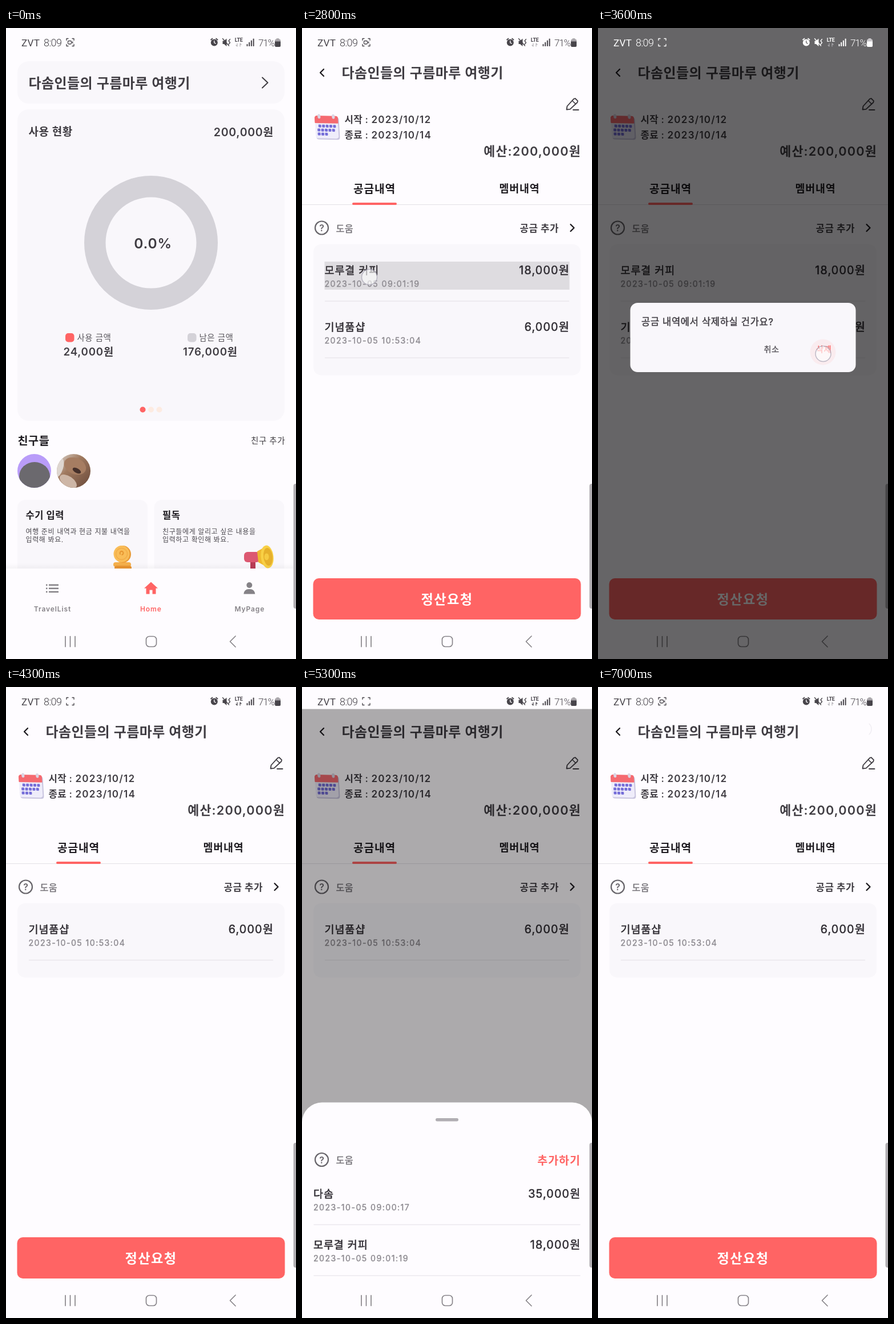
Animation of 508x1102 px, one loop 7100 ms. Source, as an HTML page with a canvas:

```html
<!DOCTYPE html>
<html lang="ko">
<head>
<meta charset="utf-8">
<title>여행 공금</title>
<style>
html, body { margin: 0; width: 100%; height: 100%; overflow: hidden; background: #fefcff; }
canvas { display: block; width: 508px; height: 1102px; }
</style>
</head>
<body>
<canvas id="stage" width="508" height="1102"></canvas>
<script>
const W = 508, H = 1102, LOOP = 7100, STEP = 100;
const BG = '#fefcff', CARD = '#f9f7fb', CORAL = '#ff6464', INK = '#403d43', DARK = '#1f1c21',
  GREY = '#77747a', LINE = '#e3e0e5', RING = '#d4d2d8';
const KO = 'Inter, "Noto Sans CJK KR", "Noto Sans CJK", sans-serif';
const TRIP = '다솜인들의 구름마루 여행기';
const ITEMS = [
  { name: '다솜', sum: '35,000원', date: '2023-10-05 09:00:17' },
  { name: '모루결 커피', sum: '18,000원', date: '2023-10-05 09:01:19' },
  { name: '기념품샵', sum: '6,000원', date: '2023-10-05 10:53:04' }
];
const canvas = document.getElementById('stage');
const c = canvas.getContext('2d');

const clamp = v => Math.max(0, Math.min(1, v));
const ramp = (t, from, to) => clamp((t - from) / (to - from));
const easeOut = u => 1 - (1 - u) ** 3;
const easeIn = u => u * u;

// y is the vertical middle of the glyphs; medium weight is regular with a thin outline
function text(s, x, y, size, o = {}) {
  const { w = 600, color = INK, ls = 0, align = 'left', font = KO } = o;
  const medium = w === 500;
  c.font = `${medium ? 400 : w} ${size}px ${font}`;
  c.letterSpacing = ls + 'px';
  c.textAlign = align;
  c.fillStyle = c.strokeStyle = color;
  c.fillText(s, x, y + size * 0.365);
  if (medium) {
    c.lineWidth = size * 0.028;
    c.strokeText(s, x, y + size * 0.365);
  }
}
function box(x, y, w, h, r, color) {
  c.fillStyle = color;
  c.beginPath();
  c.roundRect(x, y, w, h, r);
  c.fill();
}
function oval(x, y, rx, ry, color, turn = 0) {
  c.fillStyle = color;
  c.beginPath();
  c.ellipse(x, y, rx, ry, turn, 0, 7);
  c.fill();
}
const disc = (x, y, r, color) => oval(x, y, r, r, color);
function poly(points, { fill, stroke, lw = 1, close = false }) {
  c.beginPath();
  points.forEach(([x, y], i) => i ? c.lineTo(x, y) : c.moveTo(x, y));
  if (close || fill) c.closePath();
  c.lineJoin = c.lineCap = 'round';
  if (fill) { c.fillStyle = fill; c.fill(); }
  if (stroke) { c.strokeStyle = stroke; c.lineWidth = lw; c.stroke(); }
}
function ring(x, y, r, color, lw, from = 0, to = 7) {
  c.strokeStyle = color;
  c.lineWidth = lw;
  c.beginPath();
  c.arc(x, y, r, from, to);
  c.stroke();
}
const hline = (x1, x2, y, color = LINE) => { c.fillStyle = color; c.fillRect(x1, y, x2 - x1, 1); };
function shade(alpha, y = 0) {
  c.fillStyle = `rgba(0,0,0,${alpha})`;
  c.fillRect(0, y, W, H - y);
}
// Fades everything drawn so far towards the background
function veil(visible) {
  c.globalAlpha = 1 - visible;
  c.fillStyle = BG;
  c.fillRect(0, 0, W, H);
  c.globalAlpha = 1;
}
function touch(x, y) {
  disc(x, y, 14, 'rgba(255,255,255,.62)');
  ring(x, y, 13.5, 'rgba(130,125,150,.5)', 1.5);
}
function inCircle(x, y, r, draw) {
  c.save();
  c.beginPath();
  c.arc(x, y, r, 0, 7);
  c.clip();
  draw();
  c.restore();
}

function avatars() {
  inCircle(49.5, 773.5, 29.5, () => {
    c.fillStyle = '#b99cf9';
    c.fillRect(20, 744, 60, 60);
    oval(50, 783, 27, 25, '#6b696e');
  });
  inCircle(118.5, 773.5, 29.5, () => {
    const g = c.createLinearGradient(95, 750, 145, 800);
    g.addColorStop(0, '#cfc0b4');
    g.addColorStop(0.35, '#a07a60');
    g.addColorStop(1, '#6d4c3c');
    c.fillStyle = g;
    c.fillRect(88, 743, 61, 61);
    oval(93, 768, 7, 17, '#ded6d0', 0.3);
    oval(121, 765, 20, 14, '#a67d62', 0.4);
    oval(109, 792, 17, 9, '#cdb6a6', 0.6);
    oval(124, 773, 8, 4, '#46302a', 0.5);
  });
}
function coins() {
  box(188, 933, 31, 8, 4, '#f5b04b');
  box(190, 939, 30, 8, 4, '#e99532');
  oval(204.5, 919, 14.5, 15, '#e89a36');
  oval(202.5, 918.5, 14, 14.5, '#f9bd58');
  ring(202.5, 918.5, 10, '#f2ad48', 1.5);
  ring(202.5, 917, 3, '#e79630', 2, 2.5, 7.6);
}
function megaphone() {
  box(428, 928, 9, 20, 3, '#b93c55');
  box(417, 915, 28, 18, 6, '#dc5871');
  poly([[440, 914], [457, 904.5], [460, 943], [442, 933]], { fill: '#efb92f' });
  oval(457.5, 923.5, 11, 20, '#f8d045', -0.12);
  oval(459, 923.5, 8, 15.5, '#e6b02c', -0.12);
  oval(456.5, 923.5, 4, 6, '#f6cb42');
}
function noteCard(x, title, lines) {
  box(x, 824, 228, 140, 14, CARD);
  text(title, x + 14.5, 851, 16.5, { color: DARK, ls: 0.5 });
  lines.forEach((s, i) => text(s, x + 14.5, 879.5 + i * 14.5, 12, { w: 400, color: '#4d4a50', ls: 0.62 }));
}
function legend(x, color, label, sumX, sum) {
  box(x, 533, 15.5, 15.5, 5, color);
  text(label, x + 20.5, 540.5, 14.5, { w: 400, color: '#5a575d', ls: 0.5 });
  text(sum, sumX, 565.5, 18.7, { ls: 0.8 });
}
function tabBar() {
  const g = c.createLinearGradient(0, 934, 0, 944);
  g.addColorStop(0, 'rgba(0,0,0,0)');
  g.addColorStop(1, 'rgba(0,0,0,.035)');
  c.fillStyle = g;
  c.fillRect(0, 934, W, 10);
  c.fillStyle = BG;
  c.fillRect(0, 944, W, H - 944);
  const tone = '#858287';
  for (const y of [971.5, 977.5, 983.5]) {
    box(70, y, 2.5, 2.5, 0, tone);
    box(75, y, 17, 2.5, 0, tone);
  }
  poly([[254, 967.5], [266, 978.5], [262.5, 978.5], [262.5, 988.5], [256.5, 988.5], [256.5, 981.5],
    [251.5, 981.5], [251.5, 988.5], [245.5, 988.5], [245.5, 978.5], [242, 978.5]], { fill: CORAL });
  disc(426.3, 973, 5, tone);
  box(416.3, 980, 20, 8.5, [9, 9, 0, 0], tone);
  const label = (s, x, color) => text(s, x, 1014.5, 12, { color, ls: 0.9, align: 'center' });
  label('TravelList', 81.5, tone);
  label('Home', 253.8, CORAL);
  label('MyPage', 426.8, tone);
}
function homePage(t) {
  box(20, 58, 468, 74, 20, CARD);
  if (t >= 800) box(20, 58, 468, 74, 20, 'rgba(0,0,0,.07)');
  text(TRIP, 39.5, 96, 24, { ls: 0.45 });
  poly([[449, 86.5], [458.5, 95.5], [449, 104.5]], { stroke: INK, lw: 2 });
  box(20, 142, 468, 544, 20, CARD);
  text('사용 현황', 39.5, 181.5, 19, { ls: 0.5 });
  text('200,000원', 469, 181.5, 19.5, { ls: 0.7, align: 'right' });
  ring(254, 375, 98.25, RING, 37.5);
  text('0.0%', 257.5, 376, 24.5, { ls: 0.8, align: 'center' });
  legend(104, CORAL, '사용 금액', 100.5, '24,000원');
  legend(318, RING, '남은 금액', 310, '176,000원');
  [CORAL, '#fdebe1', '#fdebe1'].forEach((color, i) => disc(239.5 + i * 14.5, 666.5, 5, color));
  text('친구들', 20.5, 720.5, 19.7, { color: DARK, ls: 0.5 });
  text('친구 추가', 489, 720.5, 14.5, { w: 400, ls: 0.5, align: 'right' });
  avatars();
  noteCard(20, '수기 입력', ['여행 준비 내역과 현금 지불 내역을', '입력해 봐요.']);
  noteCard(259.5, '필독', ['친구들에게 알리고 싶은 내용을', '입력하고 확인해 봐요.']);
  coins();
  megaphone();
  tabBar();
}

function calendar() {
  c.save();
  c.transform(1, 0.02, 0.06, 1, -11, -1);
  box(25, 156, 41, 39, 4, '#c9c5df');
  box(24, 155, 40, 38, 4, '#efedfa');
  box(23.5, 153.5, 41, 13, [4, 4, 1, 1], '#f56a70');
  for (const x of [29, 54]) box(x, 150.5, 5, 8, 2.5, '#dcd6e4');
  for (let i = 0; i < 13; i++) {
    const row = Math.floor(i / 5), col = i % 5;
    box(27.5 + col * 6.4 + (row ? 0 : 2), 169 + row * 7, 5, 5, 1.3, '#756ed8');
  }
  c.restore();
}
function pencil() {
  poly([[463.5, 142.5], [464.5, 136.5], [476, 123.8], [478.5, 123], [483, 127.3], [482.3, 130], [469.5, 141.8]],
    { stroke: INK, lw: 1.8, close: true });
  poly([[473.5, 127], [479.5, 132.8]], { stroke: INK, lw: 1.6 });
  poly([[475, 143], [484.5, 143]], { stroke: INK, lw: 1.8 });
}
function help(y) {
  ring(34.5, y, 11.5, '#68656b', 2.2);
  text('?', 34.5, y + 0.5, 16, { color: '#68656b', align: 'center' });
  text('도움', 59.5, y + 1, 16.2, { w: 500, color: GREY, ls: 0.4 });
}
function entry({ name, sum, date }, x1, x2, y) {
  text(name, x1 - 0.5, y, 18.5, { w: 500, color: '#302d33', ls: 0.9 });
  text(sum, x2 + 1, y, 19.7, { w: 500, color: '#302d33', ls: 1.2, align: 'right' });
  text(date, x1 - 0.5, y + 24, 14.2, { w: 500, color: '#8d8a90', ls: 1.45 });
  hline(x1, x2, y + 53.5);
}
function period(label, date, y) {
  text(label, 74.5, y, 16.8, { ls: 0.3 });
  text(date, 121.5, y, 17.1, { ls: 1.2 });
}
function detailPage(t) {
  poly([[38, 72], [32, 78], [38, 84]], { stroke: DARK, lw: 2.3 });
  text(TRIP, 69.5, 78.5, 24, { ls: 0.45 });
  pencil();
  calendar();
  period('시작 :', '2023/10/12', 160);
  period('종료 :', '2023/10/14', 186.5);
  text('예산:200,000원', 489, 215, 21.7, { ls: 1.2, align: 'right' });
  text('공금내역', 127, 280.5, 19.2, { color: DARK, ls: 0.9, align: 'center' });
  text('멤버내역', 381, 280.5, 18.4, { color: DARK, ls: 0.8, align: 'center' });
  hline(0, W, 308);
  box(88, 305, 78, 4, 2, CORAL);
  help(349);
  text('공금 추가', 450, 349.5, 16.8, { ls: 0.5, align: 'right' });
  poly([[470.5, 343], [476.5, 349], [470.5, 355]], { stroke: DARK, lw: 2.3 });

  const list = t >= 3800 ? ITEMS.slice(2) : ITEMS.slice(1);
  box(20, 377.5, 468, 31 + list.length * 99, 14, CARD);
  const held = ramp(t, 2100, 2600) * (1 - ramp(t, 2900, 3200));
  if (held) box(39.5, 408, 429, 49, 0, `rgba(0,0,0,${0.11 * held})`);
  list.forEach((item, i) => entry(item, 40, 468, 423 + i * 99));

  box(19.5, 961, 469, 72, 10, CORAL);
  text('정산요청', 254, 998, 23.2, { color: '#fff', ls: 1.4, align: 'center' });
}
function sheet(u, dim) {
  if (dim) shade(0.325 * dim, 38.5);
  if (!u) return;
  c.save();
  c.translate(0, (1 - u) * (H - 726));
  box(0, 725.5, W, H, [35, 35, 0, 0], BG);
  box(234, 753, 40, 5.5, 2.7, '#b1aeb3');
  help(825.5);
  text('추가하기', 488, 826.5, 19.5, { color: CORAL, ls: 1, align: 'right' });
  entry(ITEMS[0], 20.5, 487.5, 885);
  entry(ITEMS[1], 20.5, 487.5, 974);
  c.restore();
  if (u === 1) { c.fillStyle = BG; c.fillRect(0, 1043, W, H - 1043); }
}
function dialog(u, t) {
  if (!u) return;
  c.globalAlpha = u;
  box(56.5, 480, 395, 121, 13, CARD);
  text('공금 내역에서 삭제하실 건가요?', 76, 513, 16.5, { w: 500, ls: 0.7 });
  text('취소', 290.5, 560.5, 14.2, { w: 500, color: '#5f5c62', ls: 0.5 });
  if (t >= 3600) disc(394, 566, 22.5, 'rgba(255,100,100,.08)');
  text('삭제', 382, 560.5, 14.2, { w: 500, color: CORAL, ls: 0.5 });
  c.globalAlpha = 1;
}

function navKeys() {
  const tone = '#88858a';
  for (const x of [104, 112.5, 121]) poly([[x, 1062.5], [x, 1080.5]], { stroke: tone, lw: 1.7 });
  c.beginPath();
  c.roundRect(245.5, 1062.5, 18, 18, 5.5);
  c.stroke();
  poly([[402, 1062], [392.5, 1071.5], [402, 1081]], { stroke: tone, lw: 1.7 });
}
function statusBar(t, light) {
  const tone = light ? '#fff' : '#48454b', back = light ? '#676568' : BG;
  const font = 'Roboto, sans-serif';
  text('ZVT', 27, 25.5, 17.2, { w: 400, color: tone, font, ls: 0.3 });
  text('8:09', 66, 25.5, 18, { w: 300, color: tone, font, ls: -0.6 });

  // Screen recorder mark, blinking once a second
  for (const [sx, sy] of [[-1, -1], [1, -1], [-1, 1], [1, 1]])
    poly([[112.5 + sx * 3.5, 25 + sy * 6.5], [112.5 + sx * 6.5, 25 + sy * 6.5], [112.5 + sx * 6.5, 25 + sy * 3.5]],
      { stroke: tone, lw: 1.3 });
  if ((t + 200) % 1000 < 500) {
    c.beginPath();
    c.roundRect(108.5, 22.5, 6, 5.5, 1.5);
    c.stroke();
    poly([[115, 25], [117.3, 23], [117.3, 27.5]], { fill: tone });
  }

  disc(364.8, 25.5, 6, tone);
  poly([[359, 20.5], [361.5, 18.5]], { stroke: tone, lw: 1.8 });
  poly([[368, 18.5], [370.6, 20.5]], { stroke: tone, lw: 1.8 });
  poly([[364.8, 22.3], [364.8, 25.8], [367.3, 27]], { stroke: back, lw: 1.3 });
  poly([[379.5, 22.5], [382, 22.5], [386.5, 18.5], [386.5, 32], [382, 28], [379.5, 28]], { fill: tone });
  poly([[379.5, 18.5], [390.5, 31]], { stroke: tone, lw: 1.4 });
  poly([[392.5, 19.5], [390, 22.5], [392.5, 25.5], [390, 28.5]], { stroke: tone, lw: 1.3 });
  text('LTE', 407.6, 20.5, 9, { w: 600, color: tone, font, align: 'center', ls: -0.3 });
  const busy = (t >= 1800 && t < 2800) || (t >= 3800 && t < 5800);
  const arrow = busy ? tone : light ? '#aaa8ac' : '#b5b2b7';
  poly([[405, 27], [405, 32], [403, 30]], { stroke: arrow, lw: 1.2 });
  poly([[410, 32], [410, 27], [412, 29]], { stroke: arrow, lw: 1.2 });
  for (let i = 0; i < 4; i++) box(421.5 + i * 3.7, 28 - i * 3.2, 2, 4 + i * 3.2, 0.8, tone);
  text('71%', 442, 25.5, 17, { w: 300, color: tone, font, ls: -1.2 });
  box(473.5, 18, 5, 3, 1, light ? '#c9c7ca' : '#b0adb2');
  box(471, 19.5, 10, 13.5, 2.5, light ? '#c9c7ca' : '#aaa7ac');
  box(471, 23.5, 10, 9.5, [0, 0, 2.5, 2.5], tone);
}

function draw(t) {
  c.fillStyle = BG;
  c.fillRect(0, 0, W, H);
  if (t < 1100) {
    homePage(t);
    veil(1 - ramp(t, 850, 1050));
    if (t >= 800 && t < 1000) touch(260, 96);
  } else {
    detailPage(t);
    veil(ramp(t, 1040, 1590));
  }

  if (t >= 2200 && t < 3000) touch(118, 435);
  if (t >= 4500 && t < 4700) touch(424, 350);

  const up = easeOut(ramp(t, 4600, 5200)) * (1 - easeIn(ramp(t, 6100, 6600)));
  const dim = ramp(t, 4600, 5000) * (1 - ramp(t, 6100, 6600));
  sheet(up, dim);
  if (t >= 6100 && t < 6300) touch(466, 73);
  if (t >= 6600) ring(466, 73.5, 13, '#f0edf3', 1.5, -0.8, 0.8);

  navKeys();
  box(503.5, 796, 8, 218, 4, '#b1aeb2');

  const dark = ramp(t, 2800, 3200) * (1 - ramp(t, 3600, 3800));
  if (dark) shade(0.595 * dark);
  dialog(ramp(t, 2900, 3200) * (1 - ramp(t, 3600, 3800)), t);
  if (t >= 3600 && t < 3800) touch(394.5, 569);
  statusBar(t, dark > 0.4);
}

function tick() {
  const t = performance.now() % LOOP;
  draw(Math.floor(t / STEP) * STEP);
  requestAnimationFrame(tick);
}
tick();
</script>
</body>
</html>
```
